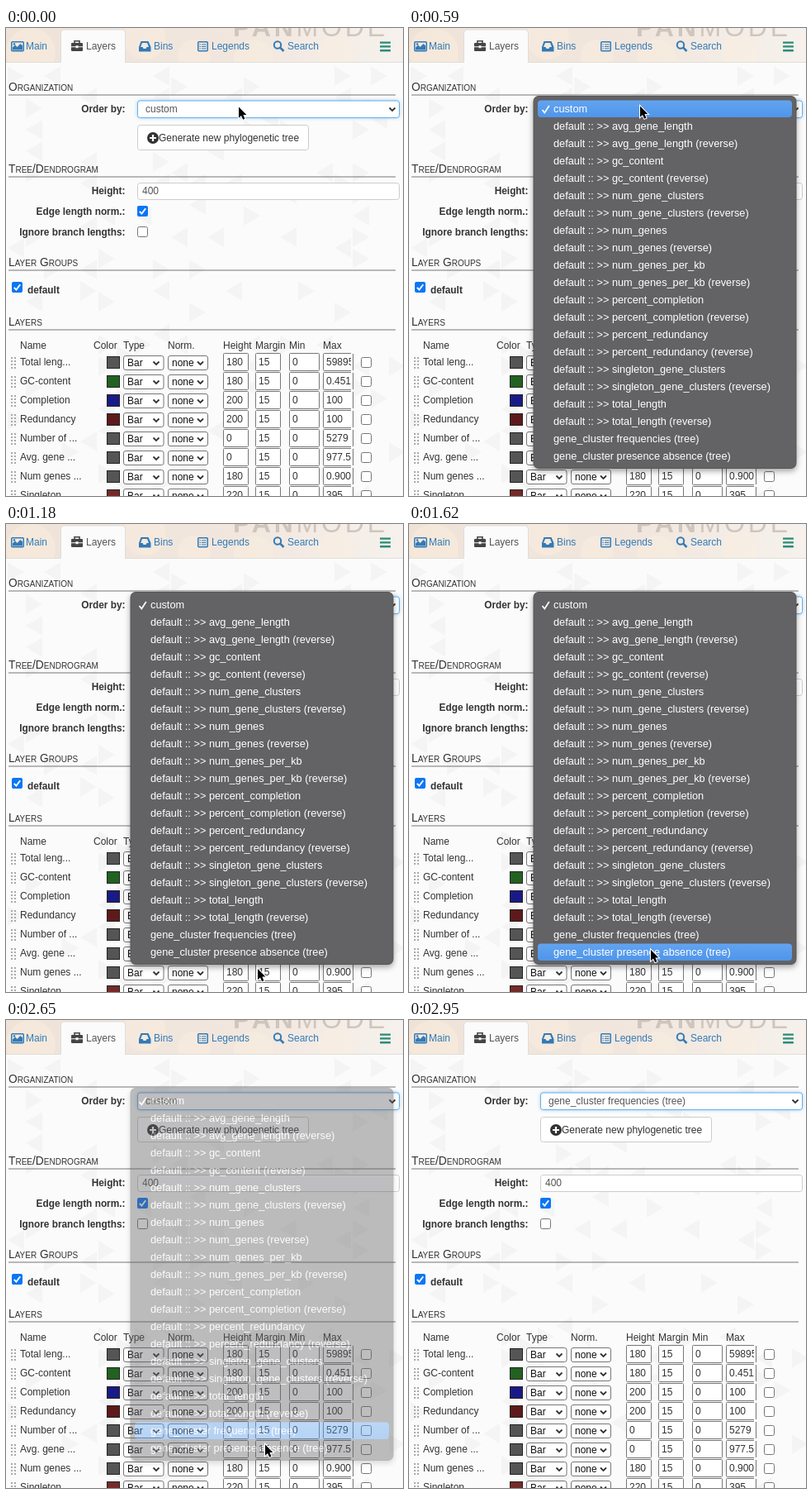
These frames come from a looping animation (481x566 px, 3.37 s). An HTML page:

```html
<!DOCTYPE html>
<html lang="en">
<head>
<meta charset="utf-8">
<title>Layers panel</title>
<style>
  html, body { margin: 0; width: 100%; height: 100%; overflow: hidden; background: #fbfbfb; }
  svg { display: block; width: 100vw; height: 100vh; }
  text { font: 12px "Liberation Sans", Arial, sans-serif; white-space: pre; }
  .label { font-size: 11.85px; font-weight: bold; fill: #333; }
  .head { font-size: 13.8px; font-variant: small-caps; fill: #333; }
  .item { font-size: 12.75px; fill: #fff; }
  .logo { font-size: 32px; letter-spacing: 3.8px; }
</style>
</head>
<body>
<svg id="stage" viewBox="0 0 481 566" xmlns="http://www.w3.org/2000/svg"></svg>
<script>
const LOOP = 3370;
const BLUE = '#337ab7';

const text = (x, y, s, fill = '#333', extra = '') =>
  `<text x="${x}" y="${y}" fill="${fill}" ${extra}>${s.replace(/>/g, '&gt;')}</text>`;
const rect = (x, y, w, h, fill, stroke = 'none', r = 0, extra = '') =>
  `<rect x="${x}" y="${y}" width="${w}" height="${h}" rx="${r}" fill="${fill}" stroke="${stroke}" ${extra}/>`;
const path = (d, fill, stroke = 'none', width = 1, extra = '') =>
  `<path d="${d}" fill="${fill}" stroke="${stroke}" stroke-width="${width}" ${extra}/>`;
const circle = (x, y, r, fill, extra = '') =>
  `<circle cx="${x}" cy="${y}" r="${r}" fill="${fill}" ${extra}/>`;
const chevron = (x, y) =>
  path(`M${x - 3.5} ${y - 1.5}l3.5 3.5 3.5-3.5`, 'none', '#333', 1.8);

function checkbox(x, y, on) {
  if (!on) return rect(x + .5, y + .5, 12, 12, '#fff', '#767676', 2);
  return rect(x, y, 13, 13, '#0b76f5', 'none', 2) +
    path(`M${x + 2.8} ${y + 6.8}l2.6 2.8 4.8-6.4`, 'none', '#fff', 1.9);
}

function triangles() {
  let seed = 11, d = '';
  const rnd = () => (seed = seed * 16807 % 2147483647) / 2147483647;
  for (let row = 0; row < 20; row++) {
    for (let col = 0; col < 22; col++) {
      if (rnd() > .27) continue;
      const x = col * 22 + 2, y = row * 26 + (col % 2) * 13 + 46;
      d += rnd() < .5 ? `M${x} ${y}v24l20-12z` : `M${x + 20} ${y}v24l-20-12z`;
    }
  }
  return path(d, '#000', 'none', 0, 'opacity=".026"');
}

function header() {
  const spots = [[30, 30, 30], [168, 12, 26], [228, 34, 20], [300, 38, 24], [400, 30, 22]];
  return rect(0, 0, 481, 42, 'url(#bar)') +
    '<g clip-path="url(#barClip)">' +
    spots.map(([x, y, r]) => circle(x, y, r, '#fbeedd', 'opacity=".45"')).join('') + '</g>' +
    text(275, 10, '<tspan font-weight="bold"\u003ePAN</tspan\u003eMODE'.replace(/>/g, '\u0001'), '#cfc5bd', 'class="logo"').replace(/\u0001/g, '>') +
    rect(0, 41, 481, 1, '#e4ddd7');
}

function tabs() {
  return path('M66.5 42V7q0-5 5-5H139.500q5 0 5 5V42', '#fbfbfb', '#ddd') +
    // picture
    rect(6.75, 16.75, 14.5, 11, 'none', BLUE, 1, 'stroke-width="1.5"') +
    path('M8 26.500v-3l3-3 2.500 2.500 4-4 2.500 2.500v5z', BLUE) +
    circle(10, 19.5, 1.3, BLUE) +
    // briefcase
    path('M83 18v-2.200h6V18', 'none', '#444', 1.6) +
    path('M79 19q0-1 1-1h12q1 0 1 1v3.200h-5.500v-1h-3v1H79zM79 23.200h5.500v1h3v-1H93V27q0 1-1 1H80q-1 0-1-1z', '#444') +
    // tray
    path('M163.500 16h9l3 7v5q0 .500-.500.500h-13.500q-.500 0-.500-.500v-5zM165 18l-2 5h2.500l1 2h3l1-2h2.500l-2-5z', BLUE, 'none', 0, 'fill-rule="evenodd"') +
    // list
    rect(232.75, 16.75, 11.5, 11, 'none', BLUE, 1, 'stroke-width="1.5"') +
    path('M234.500 20h1.500m1 0h5.500M234.500 22.500h1.500m1 0h5.500M234.500 25h1.500m1 0h5.500', 'none', BLUE, 1.2) +
    // magnifier
    circle(329, 20.5, 4.2, 'none', `stroke="${BLUE}" stroke-width="2"`) +
    path('M332.200 23.700l4.300 4.300', 'none', BLUE, 2.6) +
    [['Main', 24], ['Bins', 179], ['Legends', 249], ['Search', 341]]
      .map(([s, x]) => text(x, 26, s, BLUE)).join('') +
    text(97, 26, 'Layers', '#555') +
    [16.5, 21.3, 26.1].map(y => rect(453, y, 13, 2.3, '#2a8c74', 'none', .6)).join('');
}

function section(title, y) {
  return text(3, y, title, '#333', 'class="head"') + rect(3, y + 4.5, 469, 1, '#777');
}

function form() {
  const label = (s, y) => text(144.5, y, s, '#333', 'class="label" text-anchor="end"');
  return section('Organization', 76) + section('Tree/Dendrogram', 175) +
    section('Layer Groups', 288) + section('Layers', 360) +
    label('Order by:', 102) + label('Height:', 201) +
    label('Edge length norm.:', 226) + label('Ignore branch lengths:', 251) +
    rect(159.5, 88, 317, 20.5, '#fff', '#66afe9', 3, 'filter="url(#glow)"') +
    text(169, 102, 'custom', '#555', 'id="order"') + chevron(468, 98) +
    rect(159.5, 117.5, 207, 30, '#fff', '#ccc', 3) +
    circle(178, 133, 7, '#333') +
    path('M174 133h8M178 129v8', 'none', '#fff', 2.2) +
    text(185, 137, 'Generate new phylogenetic tree') +
    rect(159.5, 187.5, 317, 20, '#fff', '#ccc', 3) + text(165, 201, '400', '#555') +
    checkbox(159, 215, true) + checkbox(159, 240, false) +
    checkbox(7, 307, true) + text(26, 320.5, 'default', '#333', 'class="label"');
}

const LAYERS = [
  ['Total leng...', '#555', 180, '598951'],
  ['GC-content', '#226122', 180, '0.451'],
  ['Completion', '#1a1a86', 200, '100'],
  ['Redundancy', '#5e1a1a', 200, '100'],
  ['Number of ...', '#555', 0, '5279'],
  ['Avg. gene ...', '#555', 0, '977.58'],
  ['Num genes ...', '#555', 180, '0.9001'],
  ['Singleton', '#762a2a', 220, '395']
];

function layerRow([name, color, height, max], i) {
  const y = 404 + i * 23;
  const select = (x, w, s) =>
    rect(x + .5, y - 7.5, w, 17, '#fff', '#767676', 2.5) + text(x + 5, y + 5, s, '#111') + chevron(x + w - 8.5, y + 1);
  const input = (x, w, s) =>
    rect(x + .5, y - 10.5, w, 21, '#fff', '#777', 1) + text(x + 4, y + 4, String(s), '#333');
  let dots = '';
  for (let k = 0; k < 8; k++) dots += rect(6 + k % 2 * 4, y - 6 + (k >> 1) * 4, 2, 2, '#aaa');
  return dots + text(17, y + 4, name) +
    rect(122.5, y - 6.5, 15, 14, color, '#222') +
    select(142, 48.5, 'Bar') + select(196, 48, 'none') +
    input(263, 30, height) + input(302, 30, 15) + input(343, 36, 0) +
    `<g clip-path="url(#maxClip)">${input(384, 36, max)}</g>` +
    rect(420, y - 10, 1, 20, '#777') + checkbox(430, y - 6, false);
}

function table() {
  const heads = { Name: 17, Color: 106, Type: 142, 'Norm.': 196, Height: 263, Margin: 302, Min: 343, Max: 384 };
  return Object.entries(heads).map(([s, x]) => text(x, 388, s)).join('') + LAYERS.map(layerRow).join('');
}

const FIELDS = ['avg_gene_length', 'gc_content', 'num_gene_clusters', 'num_genes', 'num_genes_per_kb',
  'percent_completion', 'percent_redundancy', 'singleton_gene_clusters', 'total_length'];
const ITEMS = ['custom',
  ...FIELDS.flatMap(f => [`default :: >> ${f}`, `default :: >> ${f} (reverse)`]),
  'gene_cluster frequencies (tree)', 'gene_cluster presence absence (tree)'];

function menu() {
  return '<g id="menu">' +
    rect(151, 82.5, 318, 450, '#646265', '#555', 6, 'filter="url(#shadow)"') +
    rect(156, 87.5, 308, 20.5, 'url(#hotFill)', 'none', 4, 'id="hot"') +
    path('M161.500 99l2.800 3.500 5.500-8.500', 'none', '#fff', 1.7) +
    ITEMS.map((s, i) => text(175, 102 + i * 21, s, '#fff', 'class="item"')).join('') + '</g>';
}

const $ = id => document.getElementById(id);

$('stage').innerHTML = `<defs>
  <linearGradient id="bar"><stop stop-color="#efe3d8"/><stop offset=".6" stop-color="#f1e7de"/><stop offset="1" stop-color="#f6f1ed"/></linearGradient>
  <linearGradient id="hotFill" x2="0" y2="1"><stop stop-color="#62a4f0"/><stop offset="1" stop-color="#4f95ea"/></linearGradient>
  <filter id="glow" x="-5%" y="-50%" width="110%" height="200%"><feDropShadow dx="0" dy="0" stdDeviation="2" flood-color="#66afe9" flood-opacity=".6"/></filter>
  <filter id="shadow" x="-5%" y="-5%" width="110%" height="110%"><feDropShadow dx="0" dy="3" stdDeviation="3.500" flood-opacity=".35"/></filter>
  <clipPath id="barClip"><rect width="481" height="42"/></clipPath>
  <clipPath id="maxClip"><rect x="384" y="390" width="34" height="176"/></clipPath>
</defs>` +
  rect(0, 0, 481, 566, '#fbfbfb') + header() + triangles() + tabs() + form() + table() + menu() +
  path('M0 0V13.200L3 10.400 5.200 15.200 7.400 14.200 5.400 9.600H9.400Z', '#000', '#fff', 2, 'id="cursor" paint-order="stroke"');

const order = $('order'), menuBox = $('menu'), hot = $('hot'), cursor = $('cursor');

// time, cursor x, cursor y, highlighted item, menu opacity
const STEPS = [
  [0, 282, 95.5, -1, 0],
  [290, 281, 96, -1, 0],
  [440, 280, 94.5, -1, 0],
  [590, 280, 94.5, 0, 1],
  [880, 284, 171, 1, 1],
  [1030, 296, 494.5, 16, 1],
  [1180, 305, 538, -1, 1],
  [1330, 305, 542, -1, 1],
  [1480, 300.5, 527.5, -1, 1],
  [1620, 293, 515, 20, 1],
  [1770, 287, 501, 19, 1],
  [1910, 287, 499.5, 19, 1],
  [2650, 314, 513.5, 19, .41],
  [2800, 345, 600, -1, 0]
];

function draw(t) {
  const [start, x, y, item, opacity] = STEPS.filter(s => s[0] <= t).pop();
  cursor.setAttribute('transform', `translate(${x} ${y})`);
  menuBox.setAttribute('opacity', opacity);
  hot.setAttribute('opacity', item < 0 ? 0 : 1);
  hot.setAttribute('y', 87.5 + Math.max(item, 0) * 21);
  order.textContent = start < 2800 ? ITEMS[0] : ITEMS[19];
}

const begin = performance.now();
function tick() {
  draw((performance.now() - begin) % LOOP);
  requestAnimationFrame(tick);
}
draw(0);
requestAnimationFrame(tick);
</script>
</body>
</html>
```
